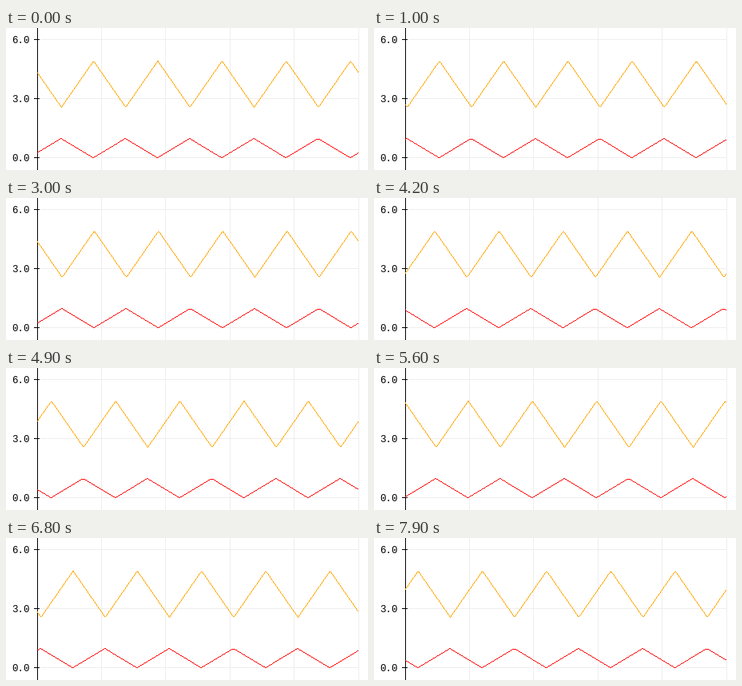
Recreate the animation shown at these times as a matplotlib script. Size 453 by 178 pixels, loop 8 s.

```python
import numpy as np
import matplotlib.pyplot as plt
from matplotlib.animation import FuncAnimation
from matplotlib.patches import Polygon, Rectangle

W, H, DPI = 453, 178, 100
PX = 72 / DPI                      # one pixel in points
LEFT, RIGHT = 39, 441              # plot area
PERIOD = (RIGHT - LEFT) / 5
FRAMES, HOLD = 80, 25              # the scroll pauses for one step at HOLD
CREST = 109.6                      # x of an upper peak at the start

# scroll distance in pixels, with the slight unevenness of the clock
STEPS = [0, 20, 29, 41, 55, 67, 78]
SHIFT = [0, 55.4, 79.5, 113.9, 152.4, 186.4, 215.1]

fig = plt.figure(figsize=(W / DPI, H / DPI), dpi=DPI, facecolor="white")
ax = fig.add_axes([0, 0, 1, 1])
ax.set_xlim(0, W)
ax.set_ylim(H, 0)
ax.axis("off")


def box(x, y, w, h, color, z):
    ax.add_patch(Rectangle((x, y), w, h, fc=color, lw=0, zorder=z))


def curve(color):
    shape = Polygon([(0, 0)], closed=True, fc=color, lw=0, zorder=4,
                    snap=False)
    return ax.add_patch(shape)


for k in range(1, 6):
    box(int(LEFT + k * PERIOD), 0, 1, H, "#eeeeee", 1)
for value, y in ((6, 14), (3, 88), (0, 162)):
    box(LEFT, y, RIGHT - LEFT, 1, "#eeeeee", 1)
    box(35, y, 7, 1, "black", 3)
    ax.text(7.6, y + 4.8, f"{value:.1f}", family="Liberation Mono",
            size=12.5 * PX, color="black", va="baseline", ha="left")
box(LEFT, 0, 1, H, "black", 2)

upper = curve("orange")
lower = curve("red")
edges = np.arange(LEFT, RIGHT + 1)


def triangle(x, crest):
    """1 at each crest, 0 halfway between."""
    return np.abs(((x - crest) / PERIOD) % 1 - 0.5) * 2


def pixel_line(y):
    """Outline of a one-pixel line, built from whole pixel columns."""
    y = np.round(y)
    top = np.minimum(y[:-1], y[1:])
    bottom = np.maximum(np.maximum(y[:-1], y[1:]), top + 1)
    x = np.repeat(edges, 2)[1:-1]
    there = np.column_stack((x, np.repeat(top, 2)))
    back = np.column_stack((x, np.repeat(bottom, 2)))
    return np.concatenate((there, back[::-1]))


def update(i):
    step = i - (i >= HOLD)
    crest = CREST - np.interp(step, STEPS, SHIFT)
    upper.set_xy(pixel_line(99.4 - 58 * triangle(edges, crest)))
    lower.set_xy(pixel_line(138.3 + 24.2 * triangle(edges, crest - 0.5)))
    return upper, lower


anim = FuncAnimation(fig, update, frames=FRAMES, interval=100,
                     repeat=True, repeat_delay=0)
plt.show()
```
